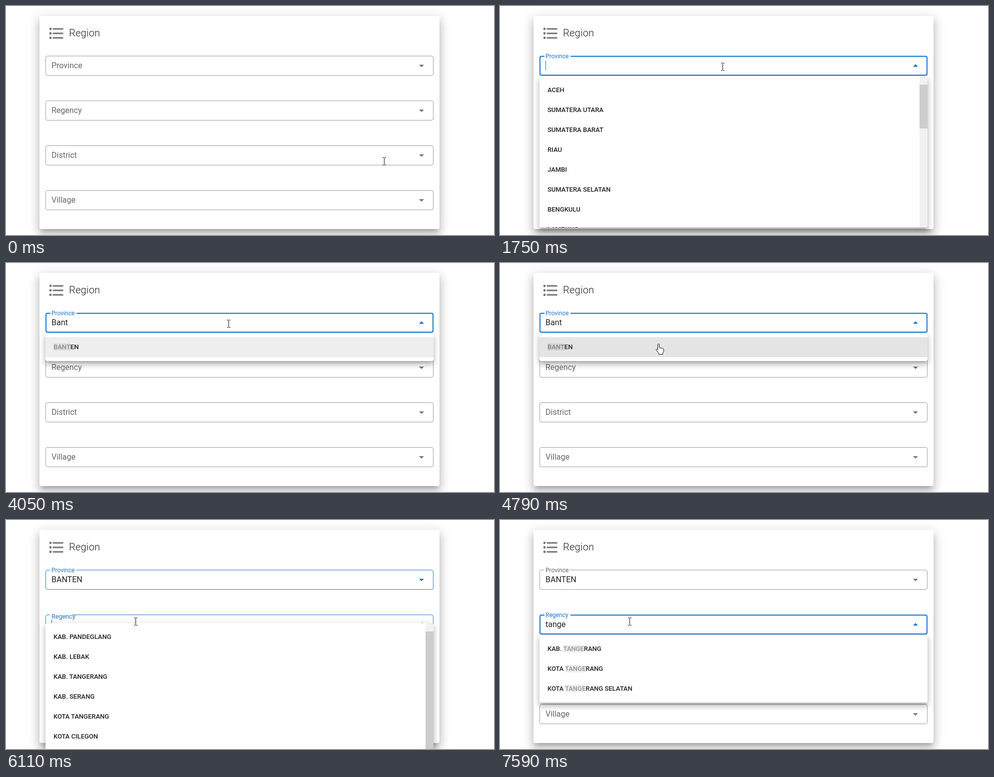
An HTML page for the animation above (8000 ms loop, 976 px wide and 460 px high).

```html
<!DOCTYPE html>
<html lang="en">
<head>
<meta charset="utf-8">
<title>Region form</title>
<style>
  html, body { margin: 0; width: 100%; height: 100%; overflow: hidden; background: #fff; }
  #stage { position: relative; width: 976px; height: 460px; overflow: hidden; font: 16px/20px Roboto, sans-serif; color: rgba(0,0,0,.87); }
  #stage div, #stage svg { position: absolute; box-sizing: border-box; white-space: pre; }
  #stage svg { overflow: visible; }
  .card { left: 67px; top: 20px; width: 800px; height: 428px; border-radius: 4px; background: #fff;
    box-shadow: 0 7px 8px -4px rgba(0,0,0,.2), 0 12px 17px 2px rgba(0,0,0,.14), 0 5px 22px 4px rgba(0,0,0,.12); }
  .title { left: 126px; top: 38px; font-size: 20px; font-weight: 300; line-height: 32px; letter-spacing: .0125em; }
  .field { left: 79px; width: 776px; height: 40px; }
  .frame { inset: 0; border: 1px solid; border-radius: 4px; }
  .notch { top: 0; height: 2px; background: #fff; }
  .label, .value { left: 12px; top: 10px; transform-origin: 0 0; }
  .caret { display: inline-block; width: 1px; height: 19px; margin-right: -1px; vertical-align: top; background: #1976d2; }
  .arrow { left: 752px; top: 20px; width: 1px; height: 1px; }
  .menu { left: 79px; width: 776px; overflow: hidden; background: #fff; border-radius: 4px;
    box-shadow: 0 5px 5px -3px rgba(0,0,0,.2), 0 8px 10px 1px rgba(0,0,0,.14), 0 3px 14px 2px rgba(0,0,0,.12); }
  .item { left: 0; width: 100%; height: 40px; padding-left: 16px; font-size: 13px; font-weight: 500; line-height: 40px; }
  .item span { background: #eee; color: rgba(0,0,0,.38); }
  .shade { inset: 0; background: #000; }
  .bar { right: 0; top: 0; width: 16px; height: 100%; background: #f1f1f1; }
  .thumb { left: 0; top: 17px; width: 16px; background: #cdcdcd; }
</style>
</head>
<body>
<div id="stage"></div>
<script>
const LOOP = 8000, BLUE = '#1976d2', MENU_MAX = 304, ROW = 40;

const provinces = ['ACEH', 'SUMATERA UTARA', 'SUMATERA BARAT', 'RIAU', 'JAMBI', 'SUMATERA SELATAN', 'BENGKULU',
  'LAMPUNG', 'KEPULAUAN BANGKA BELITUNG', 'KEPULAUAN RIAU', 'DKI JAKARTA', 'JAWA BARAT', 'JAWA TENGAH',
  'DI YOGYAKARTA', 'JAWA TIMUR', 'BANTEN', 'BALI', 'NUSA TENGGARA BARAT', 'NUSA TENGGARA TIMUR',
  'KALIMANTAN BARAT', 'KALIMANTAN TIMUR', 'SULAWESI BARAT', 'PAPUA BARAT'];
const regencies = ['KAB. PANDEGLANG', 'KAB. LEBAK', 'KAB. TANGERANG', 'KAB. SERANG', 'KOTA TANGERANG',
  'KOTA CILEGON', 'KOTA SERANG', 'KOTA TANGERANG SELATAN'];

// typed: [time, text]; carets: [on, off]
const fields = [
  { name: 'Province', y: 100, notch: 52, focus: 678, blur: 6095, open: 754, close: 5129, items: provinces,
    typed: [[2160, 'B'], [2190, 'Ba'], [2350, 'Ban'], [4040, 'Bant'], [5129, 'BANTEN']],
    carets: [[740, 1280], [1750, 2160], [2900, 3430], [5129, 5720]] },
  { name: 'Regency', y: 190, notch: 52, focus: 5968, open: 6050, items: regencies,
    typed: [[7040, 'ta'], [7270, 'tan'], [7420, 'tang'], [7590, 'tange']],
    carets: [[6000, 6500]] },
  { name: 'District', y: 280 },
  { name: 'Village', y: 370 }
];

// start, end, and the point reached
const moves = [[70, 650, 445, 122], [4400, 4980, 275, 177], [5250, 5640, 259, 204]];

const clamp = v => Math.min(1, Math.max(0, v));

// cubic-bezier(.25, .8, .5, 1)
function ease(x) {
  let lo = 0, hi = 1;
  for (let i = 0; i < 20; i++) {
    const s = (lo + hi) / 2, r = 1 - s;
    if (3 * r * r * s * .25 + 3 * r * s * s * .5 + s ** 3 < x) lo = s; else hi = s;
  }
  return 1 - (1 - lo) ** 3 - 3 * (1 - lo) ** 2 * lo * .2;
}
const progress = (t, start = Infinity) => t < start ? 0 : t >= start + 300 ? 1 : ease((t - start) / 300);
const mix = (amount, grey) => `color-mix(in srgb, ${BLUE} ${amount * 100}%, ${grey})`;
const isOpen = (f, t) => t >= f.open && !(t >= f.close);

function pointer(t) {
  let x = 756, y = 312;
  for (const [start, end, toX, toY] of moves) {
    const k = clamp((t - start) / (end - start)), s = k * k * (3 - 2 * k);
    x += (toX - x) * s;
    y += (toY - y) * s;
  }
  const over = fields.find(f => y >= f.y && y < f.y + 40);
  const onMenu = isOpen(fields[0], t) && y > 141;
  return { x: Math.round(x), y: Math.round(y), over: onMenu ? null : over, onMenu };
}

function drawPointer({ x, y, over, onMenu }) {
  const beam = '<path d="M-3-7.5h2.5l1 1 1-1H4M-3 7.5h2.5l1-1 1 1H4M.5-7V7" fill="none" stroke="#111"/>';
  const hand = '<path d="M-1.5 1q0-1.5 1.5-1.5T1.500 1v6l7 1.500q2 .5 2 2.500v3l-2 4v2.500h-8V18l-5-6q-1-2 1-2.500l2 1.500Z" fill="#fff" stroke="#111"/>';
  const arrow = '<path d="M.5.5V16l3.600-3.400 2.600 6 2.300-1-2.500-5.800h5Z" fill="#fff" stroke="#111"/>';
  return `<svg style="left:${x}px;top:${y}px" width="1" height="1">${over ? beam : onMenu ? hand : arrow}</svg>`;
}

function textAt(f, t) {
  return (f.typed || []).reduce((text, [start, next]) => t >= start ? next : text, '');
}

function drawField(f, t, mouse) {
  const raised = progress(t, f.focus), active = raised * (1 - progress(t, f.blur));
  const thick = active === 1 ? 2 : 1;
  const turn = 180 * (progress(t, f.open) - progress(t, f.close));
  const border = mouse.over === f && t >= 70 ? '#242424' : '#9e9e9e';
  const caret = (f.carets || []).some(([on, off]) => t >= on && t < off) ? '<span class="caret"></span>' : '';
  return `<div class="field" style="top:${f.y}px">
    <div class="frame" style="border-width:${thick}px;border-color:${mix(active, active ? '#9e9e9e' : border)}"></div>
    <div class="notch" style="left:${8 + thick}px;width:${(f.notch || 0) * raised}px"></div>
    <div class="label" style="color:${mix(active, '#666')};transform:translateY(${-16 * raised}px) scale(${1 - raised / 4})">${f.name}</div>
    <div class="value">${textAt(f, t)}${caret}</div>
    <svg class="arrow"><path d="M-5-2H5L0 3Z" fill="${mix(active, '#757575')}" transform="rotate(${turn})"/></svg>
  </div>`;
}

function drawItem(name, i, query, shade) {
  const at = name.indexOf(query), end = at + query.length;
  const text = query ? `${name.slice(0, at)}<span>${name.slice(at, end)}</span>${name.slice(end)}` : name;
  return `<div class="item" style="top:${8 + i * ROW}px">${text}<div class="shade" style="opacity:${shade}"></div></div>`;
}

function drawMenu(f, t) {
  if (!isOpen(f, t)) return '';
  const query = textAt(f, t).toUpperCase();
  const found = f.items.filter(name => name.includes(query));
  const full = found.length * ROW + 16, height = Math.min(full, MENU_MAX);
  const top = f === fields[1] && !query ? 207 : f.y + 41;
  const shade = found.length === 1 ? (t < 4080 ? .065 : .105) : 0;
  const chevron = (y, d) => `<path d="M4.500 ${y + d}L8 ${y - d}L11.500 ${y + d}" fill="none" stroke="#505050" stroke-width="1.600"/>`;
  const bar = full > MENU_MAX ? `<div class="bar">
    <div class="thumb" style="height:${Math.round(270 * MENU_MAX / full)}px"></div>
    <svg width="16" height="304">${chevron(9, 2)}${chevron(296, -2)}</svg></div>` : '';
  return `<div class="menu" style="top:${top}px;height:${height}px">
    ${found.map((name, i) => drawItem(name, i, query, shade)).join('')}${bar}</div>`;
}

const header = `<div class="card"></div><div class="title">Region</div>
  <svg style="left:82.5px;top:36.5px" width="36" height="36" viewBox="0 0 24 24" fill="#757575">${[6, 12, 18].map(y =>
    `<circle cx="4" cy="${y}" r="1.600"/><rect x="7" y="${y - 1}" width="14" height="2"/>`).join('')}</svg>`;
const stage = document.getElementById('stage');

function render(now) {
  const t = now % LOOP, mouse = pointer(t);
  stage.innerHTML = header + fields.map(f => drawField(f, t, mouse)).join('')
    + fields.map(f => drawMenu(f, t)).join('') + drawPointer(mouse);
}

const began = performance.now();
function tick() {
  render(performance.now() - began);
  requestAnimationFrame(tick);
}
tick();
</script>
</body>
</html>
```
